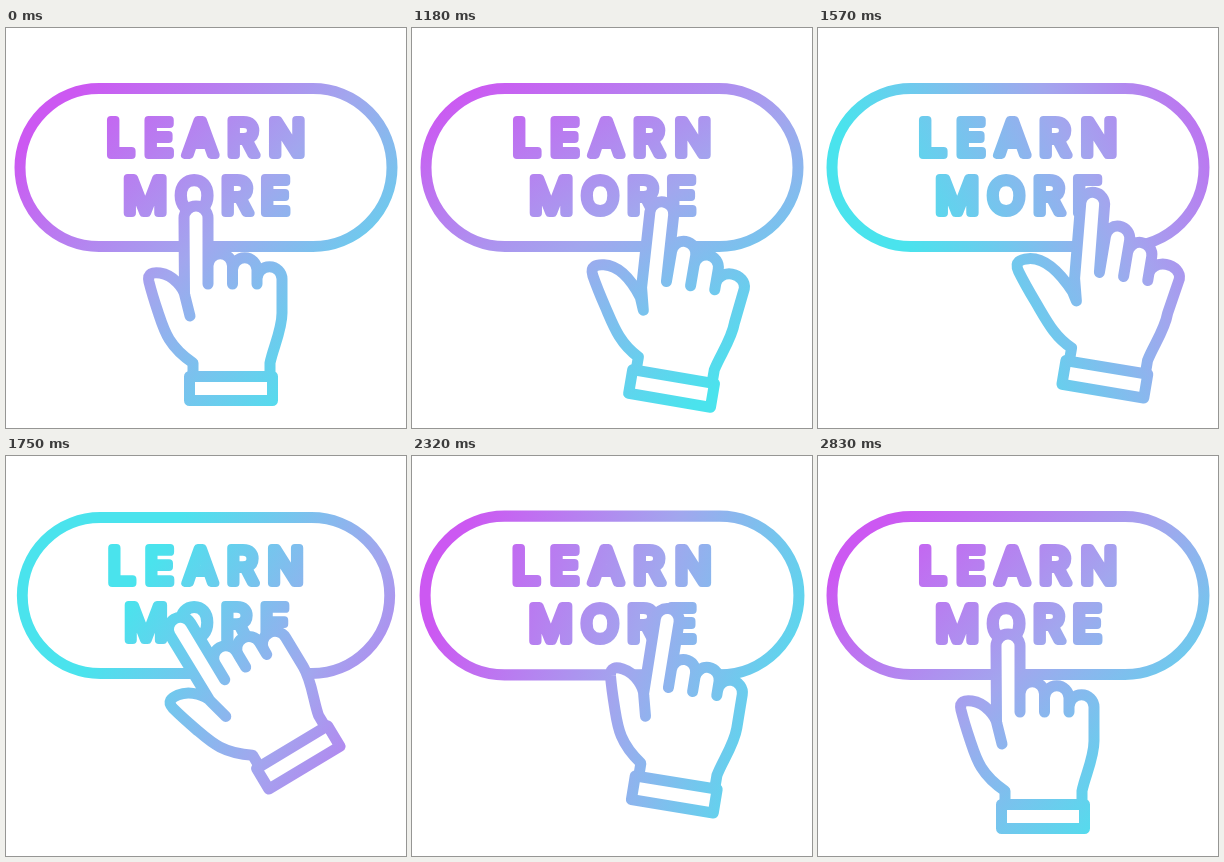
An HTML page that plays this animation: 400 by 400 pixels, repeating every 2.86 s.

```html
<!DOCTYPE html>
<html lang="en">
<head>
<meta charset="utf-8">
<title>Learn more</title>
<style>
  html, body { margin: 0; width: 100%; height: 100%; overflow: hidden; background: #fff; }
  svg { display: block; width: 100vw; height: 100vh; }
  text { font: 400 48px Inter, "Open Sans", sans-serif; text-anchor: middle; }
  .line { stroke-width: 11; stroke-linejoin: round; stroke-linecap: round; fill: #fff; }
</style>
</head>
<body>
<svg viewBox="0 0 400 400">
  <defs>
    <linearGradient id="tint" gradientUnits="userSpaceOnUse" x1="-195" y1="0" x2="195" y2="0">
      <stop offset="0" stop-color="#cc58f2"/>
      <stop offset=".5" stop-color="#a2a6ee"/>
      <stop offset="1" stop-color="#4ae3ed"/>
    </linearGradient>
    <linearGradient id="handTint" href="#tint"/>
  </defs>
  <g id="button">
    <rect class="line" stroke="url(#tint)" x="14" y="60.5" width="372" height="158" rx="79"/>
    <g fill="url(#tint)" stroke="url(#tint)" stroke-width="8" stroke-linejoin="round">
      <text x="205" y="127" letter-spacing="10.5">LEARN</text>
      <text x="205" y="184.5" letter-spacing="8.8">MORE</text>
    </g>
  </g>
  <g id="hand" class="line" stroke="url(#handTint)">
    <path id="palm"/>
    <rect x="183.5" y="348.5" width="83" height="24"/>
  </g>
</svg>
<script>
const LOOP = 2860, START = 1030, STEP = 30;
const rest = { x: 225, y: 360, turn: 0, spread: 0 };
const open = { x: 286, y: 360, turn: 17, spread: 1 };
const press = { x: 292, y: 301, turn: -31, spread: 0 };

const el = id => document.getElementById(id);
const place = (id, name, value) => el(id).setAttribute(name, value);
const part = (t, from, to) => Math.min(1, Math.max(0, (t - from) / (to - from)));
const ease = (t, from, to) => { const u = part(t, from, to); return u * u * (3 - 2 * u); };
const bump = (t, from, to) => Math.sin(Math.PI * part(t, from, to));

function handPose(t) {
  const reach = ease(t, 1000, 1330), dive = ease(t, 1510, 1750), back = ease(t, 2080, 2600);
  const pose = {};
  for (const key in rest) {
    pose[key] = rest[key] + (open[key] - rest[key]) * reach +
      (press[key] - open[key]) * dive + (rest[key] - press[key]) * back;
  }
  const swing = Math.sin(Math.PI * back);
  pose.turn += 27 * swing;
  pose.y += 11 * swing;
  return pose;
}

function palmPath(spread) {
  // The thumb swings out and stretches around its root
  const angle = .45 * spread, grow = 1 + .15 * spread;
  const cos = Math.cos(angle) * grow, sin = Math.sin(angle) * grow;
  const thumb = (x, y) => {
    const dx = x - 182, dy = y - 300;
    return `${182 + dx * cos + dy * sin} ${300 - dx * sin + dy * cos} `;
  };
  const bend = 7 * spread;
  let d = "M187 345V335C" + thumb(162, 318) + thumb(158, 302) + thumb(152, 284) +
    "S" + thumb(145, 262) + thumb(143, 254) +
    "C" + thumb(141, 245) + thumb(147, 244) + thumb(154, 245) +
    "C" + thumb(168, 247) + thumb(178, 261) + `179 ${268 + 14 * spread}L184 288L178.5 266` +
    `L${178 - bend} 190a12 12 0 0 1 24 0L202 256`;
  // Folded fingers straighten less towards the little one
  [238, 242, 251].forEach((top, i) => {
    const width = i < 2 ? 24.5 : 25 + bend;
    d += `V${top - (22 - 10 * i) * spread}a${width / 2} 12.3 0 0 1 ${width} 0`;
    d += i < 2 ? "V256" : "L276 285";
  });
  return d + "C276 302 267 320 264 335V345";
}

function draw(now) {
  const time = now % LOOP;
  const t = time < START ? 0 : START + Math.floor((time - START) / STEP) * STEP;
  const { x, y, turn, spread } = handPose(t);
  const scale = 1 - .037 * bump(t, 1700, 2160) + .02 * bump(t, 2260, 2620) ** 2;

  // The gradient makes one turn and slides back along its axis mid-way
  const angle = 45 + 360 * ease(t, 1000, 2580);
  const slide = -85 * Math.exp(-(((t - 1750) / 300) ** 2));
  const spin = `translate(225 185) rotate(${angle}) translate(${slide} 0)`;

  place("tint", "gradientTransform", spin);
  // Undo the hand's own motion so both gradients share the stage
  place("handTint", "gradientTransform",
    `translate(225 360) rotate(${-turn}) translate(${-x} ${-y}) ${spin}`);
  place("button", "transform", `translate(200 139.5) scale(${scale}) translate(-200 -139.5)`);
  place("hand", "transform", `translate(${x} ${y}) rotate(${turn}) translate(-225 -360)`);
  place("palm", "d", palmPath(spread));
}

const begin = performance.now();
function frame() {
  draw(performance.now() - begin);
  requestAnimationFrame(frame);
}
frame();
</script>
</body>
</html>
```
